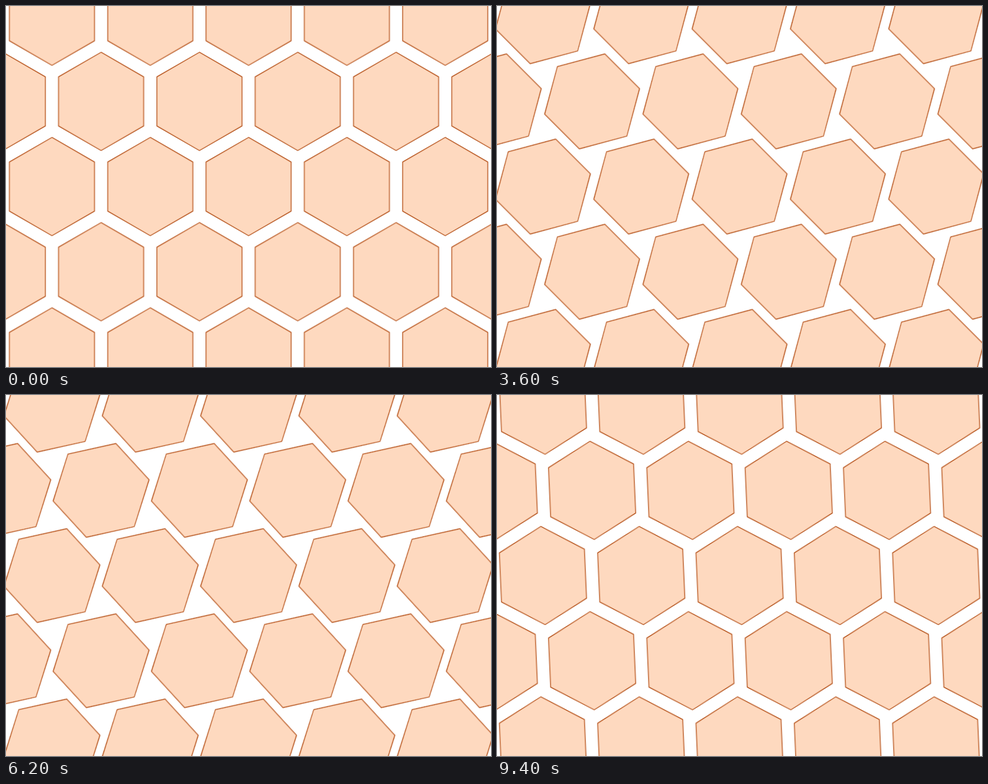
An HTML page that plays this animation: 742x552 px, repeating every 9600 ms.

```html
<!DOCTYPE html>
<html lang="en">
<head>
<meta charset="utf-8">
<title>Turning hexagons</title>
<style>
  html, body { margin: 0; width: 100%; height: 100%; overflow: hidden; background: #fff; }
  svg { display: block; }
  polygon {
    fill: #fed9bf;
    stroke: #ac3e00;
    stroke-width: 1.1;
    transform-origin: 0 0;
    animation: turn 9600ms steps(24, end) infinite;
  }
  @keyframes turn {
    0%, 100% { transform: rotate(0deg); }
    50% { transform: rotate(-60deg); }
  }
</style>
</head>
<body>
<svg id="stage" width="742" height="552" viewBox="0 0 742 552"></svg>
<script>
  const R = 75.2, PITCH_X = 2 * R, PITCH_Y = R * Math.sqrt(3);
  const CX = 371.1, CY = 276.1;
  const stage = document.getElementById('stage');

  const points = Array.from({ length: 6 }, (_, i) => {
    const a = (i * 60 - 90) * Math.PI / 180;
    return `${(R * Math.cos(a)).toFixed(3)},${(R * Math.sin(a)).toFixed(3)}`;
  }).join(' ');

  let cells = '';
  for (let row = -2; row <= 2; row++) {
    const odd = row % 2 !== 0;
    const first = odd ? -2.5 : -2;
    for (let col = first; col <= -first; col++) {
      const x = (CX + col * PITCH_X).toFixed(2);
      const y = (CY + row * PITCH_Y).toFixed(2);
      cells += `<g transform="translate(${x} ${y})"><polygon points="${points}"/></g>`;
    }
  }
  stage.innerHTML = cells;
</script>
</body>
</html>
```
